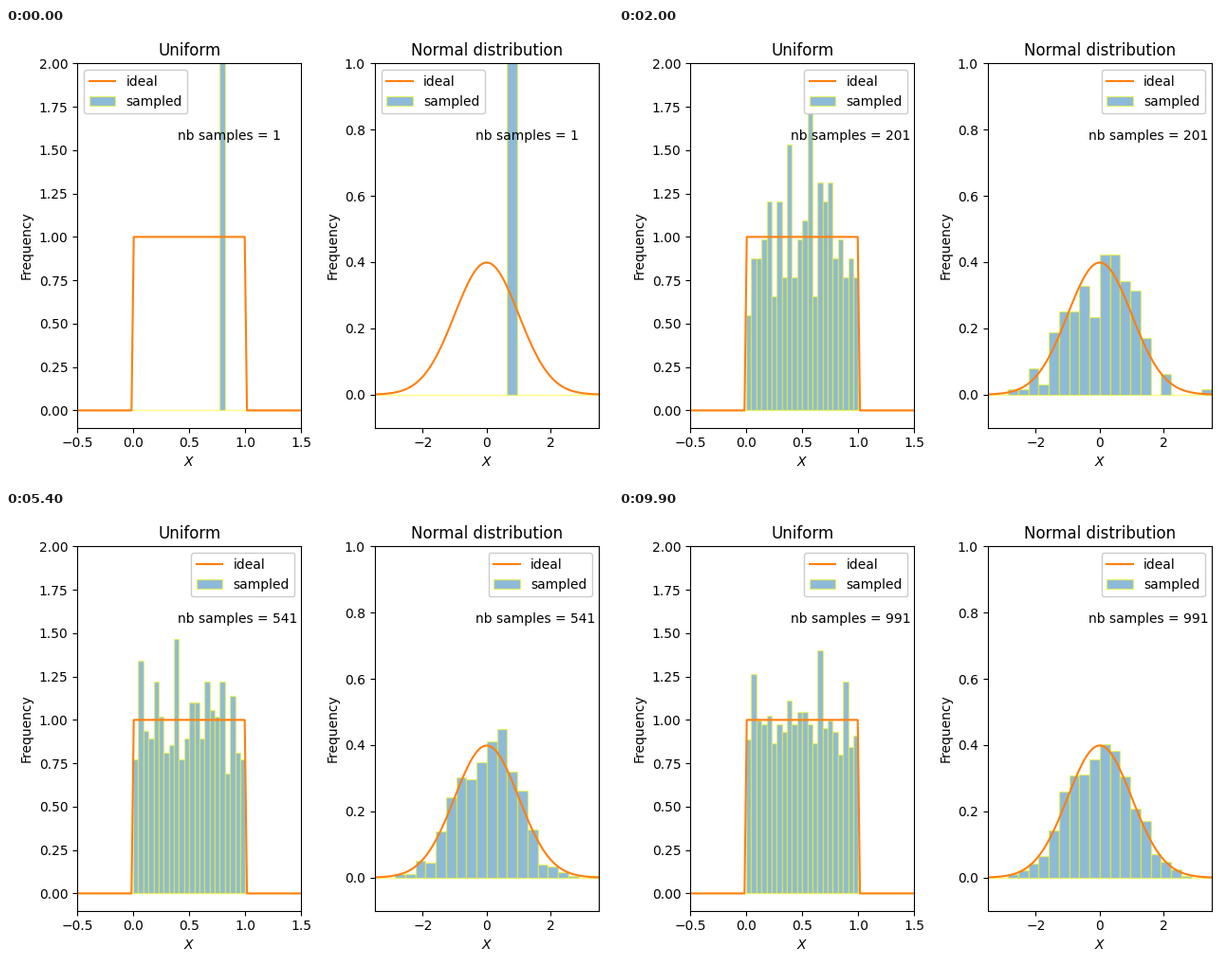
These frames come from a looping animation (640 px wide and 480 px high, 10 s). A matplotlib script:

```python
import numpy as np
import matplotlib.pyplot as plt
from matplotlib.animation import FuncAnimation
from matplotlib.patches import Patch

FRAMES, STEP = 100, 10
DRAWS = FRAMES * STEP
FIRST = 0.8  # both panels open with this sample
BAR = dict(facecolor="C0", edgecolor="yellow", alpha=0.5)
rng = np.random.default_rng(3)


class Panel:
    """Histogram of a growing sample against its ideal density."""

    def __init__(self, ax, title, xlim, top, bins, density, draws):
        self.samples = np.append(FIRST, draws)
        self.edges = np.linspace(*xlim, bins + 1)
        x = np.linspace(*xlim, 100)
        line, = ax.plot(x, density(x), color="C1", label="ideal")
        self.bars = ax.bar(self.edges[:-1], np.zeros(bins),
                           np.diff(self.edges), align="edge", **BAR)
        self.note = ax.text(0.45, 0.79, "", transform=ax.transAxes)
        self.legend = ax.legend(handles=[line, Patch(label="sampled", **BAR)],
                                loc="upper left", framealpha=1)
        ax.set(title=title, xlabel="$X$", ylabel="Frequency",
               xlim=xlim, ylim=(-0.1, top))

    def show(self, n):
        heights, _ = np.histogram(self.samples[:n], self.edges, density=True)
        for bar, height in zip(self.bars, heights):
            bar.set_height(height)
        self.note.set_text(f"nb samples = {n}")
        # The single tall bar at the start stands where the legend goes later.
        self.legend.set_loc("upper left" if n == 1 else "upper right")


def uniform(x):
    return np.where((x >= 0) & (x <= 1), 1.0, 0.0)


def normal(x):
    return np.exp(-x**2 / 2) / np.sqrt(2 * np.pi)


fig, (left, right) = plt.subplots(1, 2, figsize=(6.4, 4.8), dpi=100)
panels = [
    Panel(left, "Uniform", (-0.5, 1.5), 2, 44, uniform, rng.random(DRAWS)),
    Panel(right, "Normal distribution", (-3.5, 3.5), 1, 22, normal,
          rng.standard_normal(DRAWS)),
]
fig.tight_layout()


def update(i):
    for panel in panels:
        panel.show(STEP * i + 1)


anim = FuncAnimation(fig, update, frames=FRAMES, interval=100,
                     init_func=lambda: update(0), repeat=True, repeat_delay=0)
plt.show()
```
